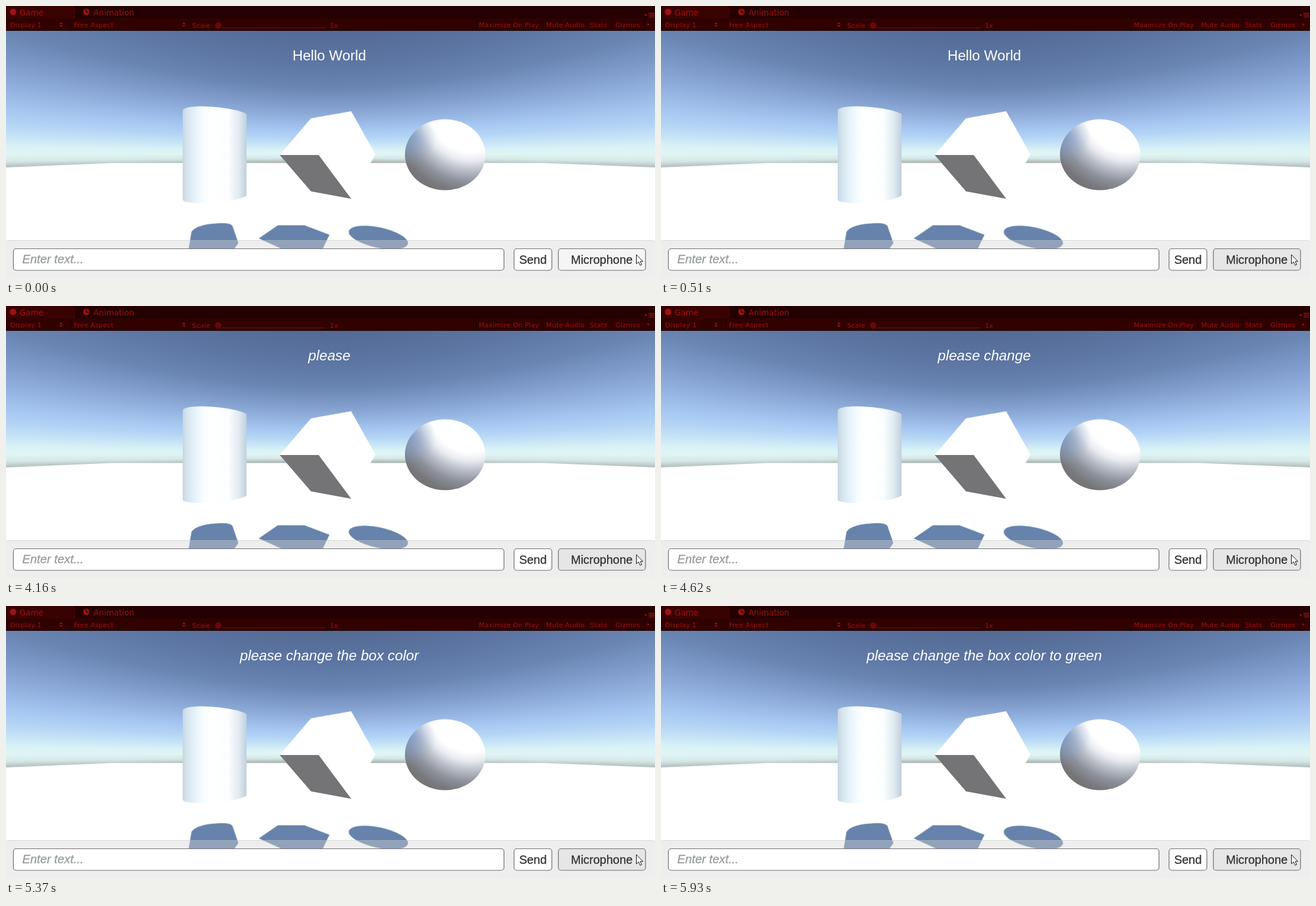
An HTML page with a canvas for the animation above (8000 ms loop, 1098 by 460 pixels).

```html
<!DOCTYPE html>
<html lang="en">
<head>
<meta charset="utf-8">
<title>Voice scene</title>
<style>
  html, body { margin: 0; width: 100%; height: 100%; overflow: hidden; background: #fff; }
  canvas, svg { position: absolute; left: 0; top: 0; width: 1098px; height: 460px; }
  .bar { font-family: "DejaVu Sans", sans-serif; font-size: 11px; letter-spacing: .25px; fill: #9c1212; }
  .tab { font-size: 13.5px; letter-spacing: 0; }
  .ui { font-family: "Liberation Sans", Arial, sans-serif; font-size: 20px; fill: #323232; stroke: #323232; stroke-width: .3; text-anchor: middle; }
  .hint { font-size: 20.3px; font-style: italic; fill: #959b9b; stroke: #959b9b; text-anchor: start; }
  #caption { font-family: "Liberation Sans", Arial, sans-serif; font-size: 24.2px; fill: #fff; text-anchor: middle; }
  .box { stroke: #6e6e6e; stroke-width: 1.2; }
  #mic { animation: press 8s step-end infinite; }
  @keyframes press {
    0% { fill: #f5f5f5; }
    5.125% { fill: #ededed; }
    6.375% { fill: #e6e6e6; }
  }
</style>
</head>
<body>
<canvas id="sky" width="1098" height="460"></canvas>
<svg viewBox="0 0 1098 460">
  <defs>
    <linearGradient id="tube">
      <stop offset="0" stop-color="#c6d6e2"/>
      <stop offset=".07" stop-color="#d6e4ee"/>
      <stop offset=".18" stop-color="#e4f2fa"/>
      <stop offset=".32" stop-color="#f8fdff"/>
      <stop offset=".45" stop-color="#fff"/>
      <stop offset=".72" stop-color="#fbfdfe"/>
      <stop offset=".88" stop-color="#e0eaf1"/>
      <stop offset="1" stop-color="#c0d0dc"/>
    </linearGradient>
    <radialGradient id="ball" gradientUnits="userSpaceOnUse" cx="787" cy="178" r="150">
      <stop offset=".46" stop-color="#fff"/>
      <stop offset=".56" stop-color="#e9ebf0"/>
      <stop offset=".67" stop-color="#b9bec8"/>
      <stop offset=".8" stop-color="#8c909a"/>
      <stop offset=".92" stop-color="#77787b"/>
      <stop offset="1" stop-color="#737375"/>
    </radialGradient>
    <radialGradient id="tint" gradientUnits="userSpaceOnUse" cx="682" cy="224" r="46">
      <stop offset="0" stop-color="#7c9ccb" stop-opacity=".75"/>
      <stop offset="1" stop-color="#8aa6d0" stop-opacity="0"/>
    </radialGradient>
  </defs>

  <!-- shadows -->
  <g fill="#6883ab" stroke="#86a5c6" stroke-width=".8">
    <path d="M314 382C319 374 335 369 355 368C372 366.500 380 368 383 372L384 375L393 401C390 405 388 408 385 412H309Z"/>
    <path d="M428 393L460 371H505L547 387L535 412H470Z"/>
    <ellipse cx="630" cy="391.500" rx="51" ry="17" transform="rotate(12 630 391.500)"/>
  </g>

  <!-- solids -->
  <path fill="url(#tube)" d="M299 176C301 171.500 314 169.500 334 169.700C366 170.500 402 177 407 183.500V320C404 325 376 331 346 333C318 334 301 332 299 328Z"/>
  <path fill="#fff" d="M463 252L516 190L584 178L625 251L583 326L516 313Z"/>
  <path fill="#747477" d="M463 252H529L584 326L516 313.500Z"/>
  <ellipse cx="743" cy="251.500" rx="68" ry="60" fill="url(#ball)"/>
  <ellipse cx="743" cy="251.500" rx="68" ry="60" fill="url(#tint)"/>

  <text id="caption" x="547" y="92"></text>

  <!-- editor header -->
  <path fill="#240000" d="M0 0H1098V42H0Z"/>
  <path fill="#390202" d="M0 0H113L117 4V21H0Z"/>
  <path fill="#310101" d="M0 21H1098V41H0Z"/>
  <path fill="#170000" d="M0 41H1098V42H0Z"/>
  <path stroke="#1e0000" d="M109.500 22V41M309.500 22V41M795.500 22V41M907.500 22V41M983.500 22V41M1024.500 22V41M1080.500 22V41"/>
  <g class="bar">
    <circle cx="12" cy="10" r="5.500"/>
    <circle cx="136" cy="10" r="5.500"/>
    <path fill="none" stroke="#240000" stroke-width="1.500" d="M136 6V10.500H140"/>
    <text class="tab" x="23" y="16">Game</text>
    <text class="tab" x="148" y="16">Animation</text>
    <text x="7" y="36">Display 1</text>
    <text x="115" y="36">Free Aspect</text>
    <text x="315" y="37">Scale</text>
    <text x="548" y="37">1x</text>
    <text x="800" y="36">Maximize On Play</text>
    <text x="914" y="36">Mute Audio</text>
    <text x="988" y="36">Stats</text>
    <text x="1031" y="36">Gizmos</text>
    <path d="M90 30.500L93 27.500L96 30.500ZM90 32.500L93 35.500L96 32.500ZM298 30.500L301 27.500L304 30.500ZM298 32.500L301 35.500L304 32.500Z"/>
    <path d="M1080 14H1085L1082.500 17ZM1084 30H1089L1086.500 33Z"/>
    <path stroke="#9c1212" stroke-width="1.400" d="M1087 12.500H1097M1087 15.500H1097M1087 18.500H1097"/>
    <path stroke="#560707" stroke-width="2" d="M364 37H540"/>
    <circle cx="359" cy="33" r="5.500" fill="#680909"/>
  </g>

  <!-- input panel -->
  <path fill="#d3d3d3" fill-opacity=".39" d="M0 400Q0 396.500 4 396.500H1094Q1098 396.500 1098 400V460H0Z"/>
  <path fill="none" stroke="#bcc4c4" stroke-opacity=".55" d="M0 400Q0 396.500 4 396.500H1094Q1098 396.500 1098 400"/>
  <g class="box">
    <rect x="12.500" y="410.500" width="830" height="36.500" rx="4.500" fill="#fff"/>
    <rect x="859.500" y="410.500" width="64" height="36.500" rx="4.500" fill="#fff"/>
    <rect id="mic" x="934.500" y="410.500" width="147.500" height="36.500" rx="4.500"/>
  </g>
  <g class="ui">
    <text class="hint" x="27.500" y="435">Enter text...</text>
    <text x="891.500" y="436">Send</text>
    <text x="1008" y="436">Microphone</text>
  </g>
  <path fill="#fff" stroke="#111" d="M1066.500 420.500V436L1070.300 432.800L1072.800 438.500L1075.500 437.300L1073 432H1077.500Z"/>
</svg>

<script>
const LOOP = 8000;
const captions = [
  [0, "Hello World"],
  [1430, "Microphone is live, start talking now..."],
  [4160, "please"],
  [4540, "please change"],
  [4720, "please change the"],
  [5000, "please change the box"],
  [5330, "please change the box color"],
  [5600, "please change the box color today"],
  [5780, "please change the box color to green"]
];

// Sky colour by slope above (+) or below (-) the horizon
const sky = [
  [.577, "#536a94"], [.42, "#5d76a3"], [.31, "#6a85b2"], [.23, "#7f9ccb"],
  [.17, "#93b1de"], [.12, "#a4c5f0"], [.08, "#b3d3f5"], [.05, "#c4e2f6"],
  [.02, "#d9f2f6"], [0, "#e0f5f3"], [-.018, "#d4e8e6"], [-.04, "#a3aaaa"]
];

function drawSky() {
  const g = document.getElementById("sky").getContext("2d");
  const horizon = 251, focal = 362, top = sky[0][0], low = sky[sky.length - 1][0];
  for (let x = 0; x < 1098; x++) {
    const d = Math.hypot(x - 549, focal);
    const fill = g.createLinearGradient(0, horizon - top * d, 0, horizon - low * d);
    for (const [k, color] of sky) fill.addColorStop((top - k) / (top - low), color);
    g.fillStyle = fill;
    g.fillRect(x, 42, 1, 240);
  }
  g.fillStyle = "#fff";
  g.beginPath();
  for (const [x, y] of [[0, 273], [180, 265.5], [910, 265.5], [1098, 273], [1098, 460], [0, 460]]) g.lineTo(x, y);
  g.fill();
}

const caption = document.getElementById("caption");
const micFade = document.getElementById("mic").getAnimations()[0];
const start = performance.now();
if (micFade) micFade.startTime = start;

function frame() {
  const t = Math.max(0, performance.now() - start) % LOOP;
  const text = captions.filter(c => c[0] <= t).pop()[1];
  if (caption.textContent !== text) {
    caption.textContent = text;
    caption.style.fontStyle = text.startsWith("please") ? "italic" : "normal";
  }
  requestAnimationFrame(frame);
}

drawSky();
frame();
</script>
</body>
</html>
```
